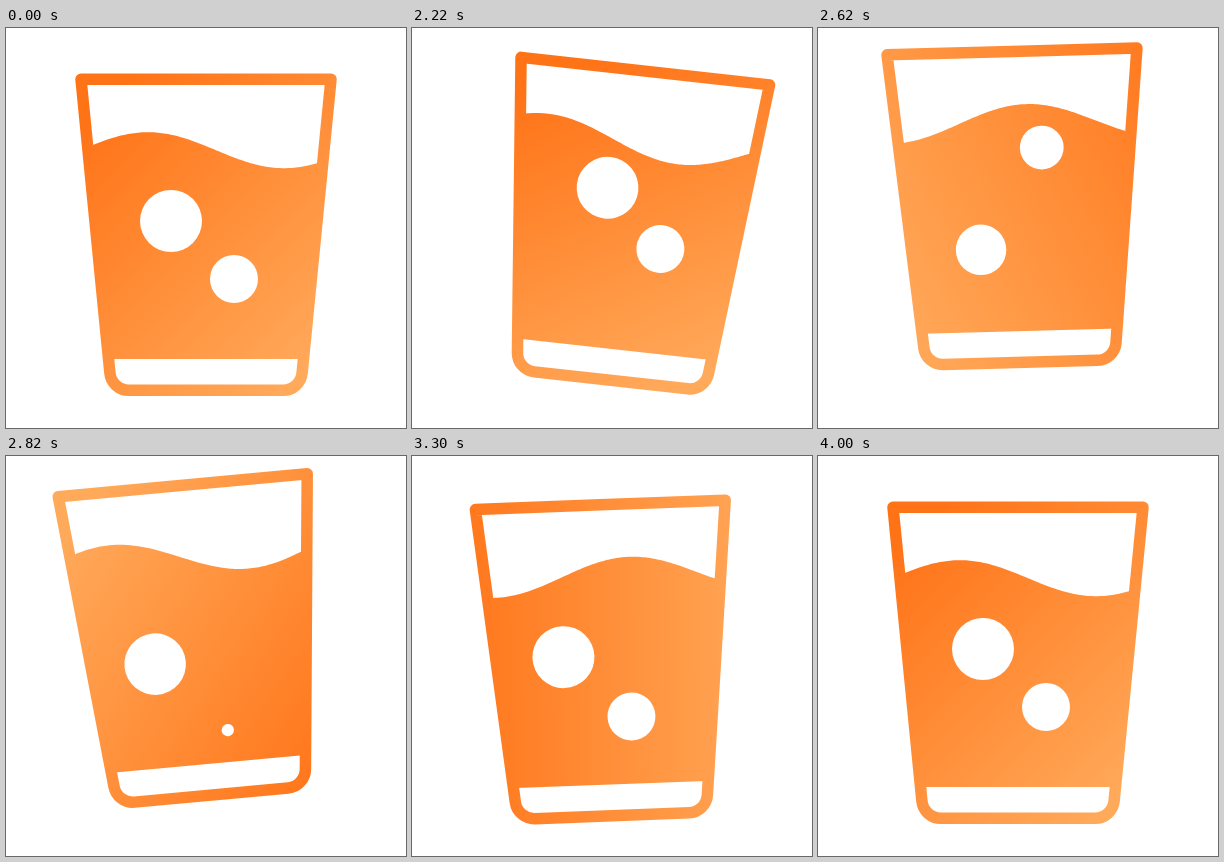
An HTML page with a canvas for the animation above (4020 ms loop, 400x400 px).

```html
<!DOCTYPE html>
<html>
<head>
<meta charset="utf-8">
<style>
html, body { margin: 0; width: 100%; height: 100%; overflow: hidden; background: #fff; }
canvas { display: block; }
</style>
</head>
<body>
<canvas id="stage" width="400" height="400"></canvas>
<script>
const c = document.getElementById('stage').getContext('2d');
const { PI, sin, cos, abs, exp, min, max } = Math;
const LOOP = 4020, REST = 2.02, BASE = 362.3, WAVELENGTH = 272;

// Each bubble rises out of the liquid until `gone`; a new one grows at `born` and settles in its place.
const bubbles = [
  { x: 165, y: 193, r: 31, sway: 11, gone: .52, born: .27, rise: 176, depth: 124 },
  { x: 228, y: 251, r: 24, sway: 7, gone: .9, born: .72, rise: 200, depth: 60 }
];

const clamp = x => max(0, min(1, x));
const part = (t, from, to) => clamp((t - from) / (to - from));
const smoother = s => s * s * s * (10 - 15 * s + 6 * s * s);
const swell = s => (1 - cos(PI * s)) / 2;

// Cubic bezier ease (.24, 0, .46, 1), solved by bisection.
function ease(x) {
  let lo = 0, hi = 1, s;
  for (let i = 0; i < 20; i++) {
    s = (lo + hi) / 2;
    const v = 1 - s;
    if (.72 * s * v * v + 1.38 * s * s * v + s * s * s < x) lo = s; else hi = s;
  }
  return s * s * (3 - 2 * s);
}

// Tip right, swing over to the left, come back upright.
const tilt = t => 6.5 * smoother(part(t, -.02, .24))
  - 11.8 * smoother(part(t, .24, .84))
  + 5.3 * smoother(part(t, .84, 1.64));

function glassPath() {
  c.beginPath();
  c.moveTo(200, 51.2);
  c.lineTo(75, 51.2);
  c.arcTo(105.6, BASE, 200, BASE, 19);
  c.arcTo(294.4, BASE, 325, 51.2, 19);
  c.lineTo(325, 51.2);
  c.closePath();
}

// The dark end circles the glass once and reaches further out during the hop.
function gradient(t, air) {
  const a = PI / 4 + 2 * PI * swell(part(t, -.02, 1.66));
  const dark = 165 + 80 * air * air, light = 165;
  const g = c.createLinearGradient(
    200 - dark * cos(a), 207 - dark * sin(a),
    200 + light * cos(a), 207 + light * sin(a));
  g.addColorStop(0, '#ff7317');
  g.addColorStop(1, '#ffa95a');
  return g;
}

function liquid(t) {
  const shift = 2 * WAVELENGTH * ease(part(t, -.02, 1.98));
  c.beginPath();
  c.moveTo(60, 331);
  for (let x = 60; x <= 340; x += 2)
    c.lineTo(x, 122.2 - 18 * cos((x - 142 + shift) * 2 * PI / WAVELENGTH));
  c.lineTo(340, 331);
  c.fill();
}

function dot(x, y, r) {
  c.beginPath();
  c.arc(x, y, r, 0, 2 * PI);
  c.fill();
}

function bubble(b, t) {
  const u = clamp(t / 1.96);
  const x = b.x + b.sway * sin(2 * PI * (1 - (1 - u) ** 2));
  const age = max(0, t);
  if (age < b.gone)
    dot(x, b.y - b.rise * age ** 1.3, b.r * (1 - (age / b.gone) ** 6));
  if (t > b.born) {
    const left = exp(-2.4 * (t - b.born)) * (1 - u ** 4);
    dot(x, b.y + b.depth * left, b.r * (1 - (1 - part(t, b.born, b.born + .58)) ** 2));
  }
}

function draw(t) {
  const angle = tilt(t) * PI / 180;
  const air = sin(PI * part(t, .1, 1.1)) ** 2;
  const hop = 26 * air;
  c.fillStyle = '#fff';
  c.fillRect(0, 0, 400, 400);
  c.save();
  // The glass rocks on a lower corner, so its middle rises with the tilt.
  c.translate(200 - 3.4 * hop * sin(angle), BASE - hop - 68 * abs(sin(angle)));
  c.rotate(angle);
  c.translate(-200, -BASE);
  const color = gradient(t, air);

  c.save();
  glassPath();
  c.clip();
  c.fillStyle = color;
  liquid(t);
  c.fillStyle = '#fff';
  for (const b of bubbles) bubble(b, t);
  c.restore();

  glassPath();
  c.strokeStyle = color;
  c.lineWidth = 11.5;
  c.lineJoin = 'round';
  c.stroke();
  c.restore();
}

let start;
function frame(now) {
  start ??= now;
  draw((now - start) % LOOP / 1000 - REST);
  requestAnimationFrame(frame);
}
requestAnimationFrame(frame);
</script>
</body>
</html>
```
